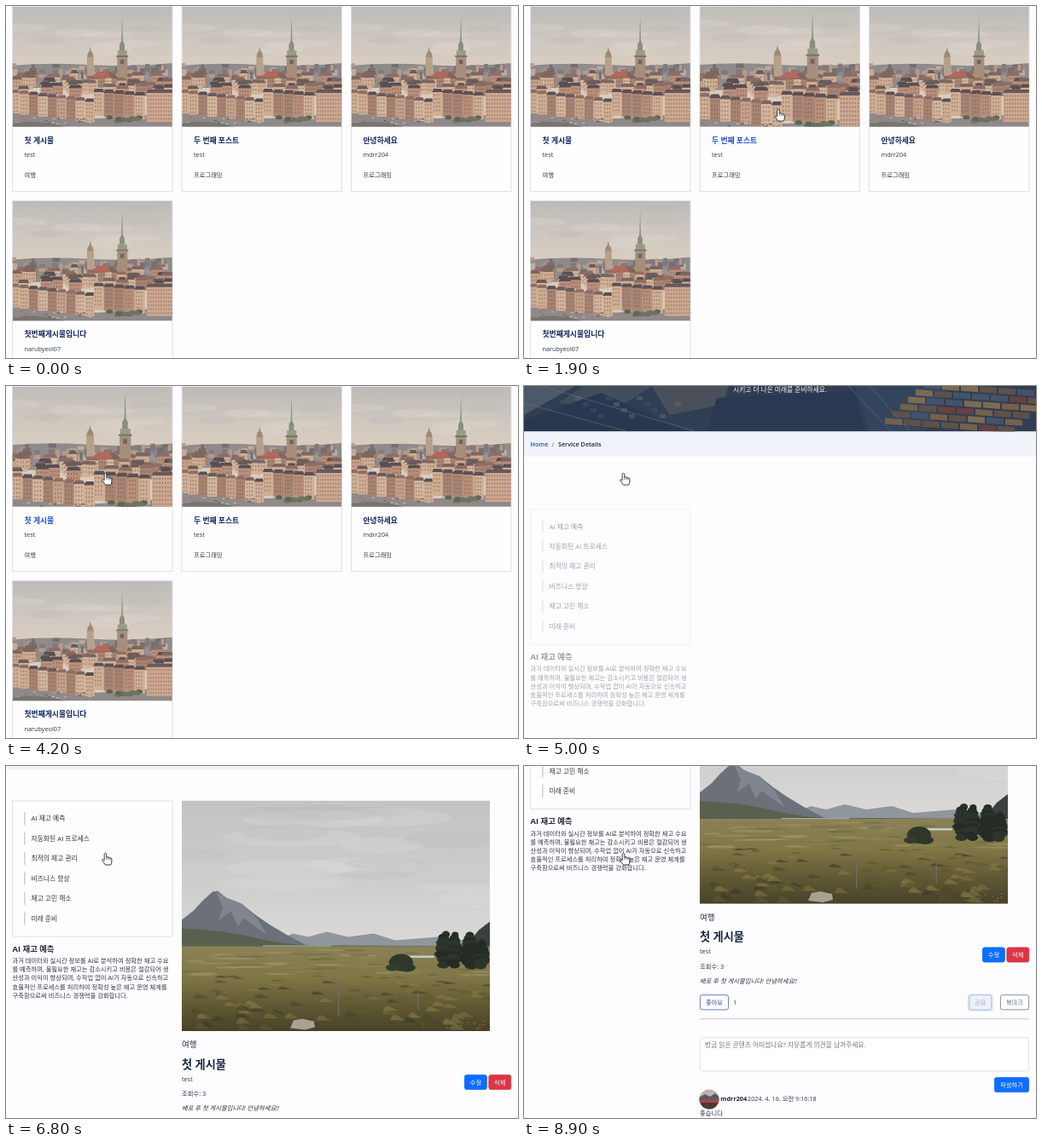
An HTML page that plays this animation: 600 px wide and 413 px high, repeating every 9000 ms.

```html
<!DOCTYPE html>
<html lang="ko">
<head>
<meta charset="utf-8">
<title>게시판</title>
<style>
  html, body { margin: 0; width: 100%; height: 100%; overflow: hidden; background: #fdfdff; }
  svg { display: block; width: 600px; height: 413px; }
  text { font-family: "Open Sans", "Noto Sans CJK KR", "Noto Sans CJK", sans-serif; white-space: pre; }
</style>
</head>
<body>
<svg id="stage" viewBox="0 0 600 413" xmlns="http://www.w3.org/2000/svg"></svg>
<script>
const LOOP = 9000, STEP = 100;
const INK = '#30343c', NAVY = '#14285f', BLUE = '#0d6efd', LINE = '#dfe0ea';

let seed = 11;
const rnd = (a = 0, b = 1) => {
  seed = (seed * 16807) % 2147483647;
  return a + (b - a) * seed / 2147483647;
};
const pick = list => list[Math.floor(rnd(0, list.length))];
const n = v => +v.toFixed(1);
const many = (count, fn) => Array.from({ length: count }, (_, i) => fn(i)).join('');

const rect = (x, y, w, h, fill, more = '') =>
  `<rect x="${n(x)}" y="${n(y)}" width="${n(w)}" height="${n(h)}" fill="${fill}" ${more}/>`;
const path = (d, fill, more = '') => `<path d="${d}" fill="${fill}" ${more}/>`;
const oval = (x, y, rx, ry, fill, more = '') =>
  `<ellipse cx="${n(x)}" cy="${n(y)}" rx="${n(rx)}" ry="${n(ry)}" fill="${fill}" ${more}/>`;
// y is the middle of the line
const text = (x, y, size, str, fill = INK, more = '') =>
  `<text x="${x}" y="${n(y + size * 0.36)}" font-size="${size}" fill="${fill}" ${more}>${str}</text>`;
const gradient = (id, ...stops) =>
  `<linearGradient id="${id}" x2="0" y2="1">${stops.map(([o, c]) => `<stop offset="${o}" stop-color="${c}"/>`).join('')}</linearGradient>`;
const button = (x, y, w, label, fill, stroke, color) =>
  rect(x + .4, y + .4, w - .8, 17.2, fill, `rx="2.5" stroke="${stroke}" stroke-width=".8"`) +
  text(x + w / 2, y + 9, 7.3, label, color, 'text-anchor="middle"');

function house(x, y, w, h, wall, roof) {
  let s = rect(x, y, w, h, wall) +
    path(`M${n(x - .5)} ${n(y)}l2 -4h${n(w - 3)}l2 4z`, roof);
  for (let r = y + 2.5; r < y + h - 3; r += 4.5)
    for (let c = x + 1.5; c < x + w - 1.5; c += 3) s += rect(c, r, 1.1, 2, '#6e5a55', 'opacity=".6"');
  return s;
}

function city() {
  const walls = ['#c6a088', '#b98f7a', '#cfae93', '#a98472', '#d2b59c'];
  const roofs = ['#6a5c5a', '#7d665f', '#584f52', '#8f6d62'];
  let s = rect(0, 0, 187, 141, 'url(#citySky)');
  s += many(9, () => oval(rnd(0, 187), rnd(8, 52), rnd(18, 40), rnd(3, 7), pick(['#e0d8cc', '#b9b5b2']), 'opacity=".3"'));
  s += path('M0 69Q40 65 90 68T187 66V95H0Z', '#8f8b8b');
  s += many(60, () => rect(rnd(-3, 184), rnd(66, 80), rnd(3, 9), rnd(4, 10), pick(['#a0938c', '#84797a', '#b49c8d', '#766f72', '#c0aa99'])));
  s += rect(87, 59, 8, 22, '#b7a08a') + path('M87 59l1.5-6h1l1.5-6 1.5 6h1l1.5 6z', '#9c8b78');
  s += many(48, i => house(rnd(-4, 180), 78 + i * .4, rnd(8, 16), rnd(10, 15), pick(walls), pick(roofs)));
  s += path('M127.4 40L128.3 11l.9 29 2 4v7h-6v-7z', '#87907f');
  s += rect(123, 51, 11, 7, '#9a9a86') + rect(121.5, 57, 14, 2, '#6f776c') + rect(122.5, 59, 12, 24, '#a58f7c');
  s += rect(126, 62, 4.5, 5, '#70675f') + path('M93 82l6-6h12l4 7z', '#b5675a');
  s += path('M0 123L100 131L187 125V141H0Z', '#8f8989');
  s += many(9, i => house(i * 11 - 3, 101 + i * 1.3, 11, 24, pick(walls), pick(roofs)));
  s += many(5, i => house(95 + i * 12, 100 + i, 12, 28, pick(walls), '#5b5054'));
  s += house(157, 101, 32, 34, '#cda78f', '#66595b');
  s += many(12, () => oval(rnd(112, 156), rnd(129, 134), 4, 2.5, pick(['#5c6654', '#6d7460'])));
  s += many(26, () => rect(rnd(2, 105), rnd(129, 138), 3, 1.2, pick(['#5f5d62', '#c5bdb6', '#a36f66'])));
  s += path('M0 137Q30 131 62 141H0Z', '#77756f');
  return s;
}

function pine(x, top, bottom, w) {
  return many(12, i => {
    const k = i / 11;
    return oval(x + rnd(-2, 2), top + (bottom - top) * k, 2 + w / 2 * Math.sin(.3 + k * 2.2), 4, pick(['#252b25', '#2d342b']));
  });
}

function valley() {
  let s = rect(0, 0, 361, 271, 'url(#valleySky)');
  s += many(16, () => oval(rnd(0, 361), rnd(10, 130), rnd(40, 90), rnd(4, 12), pick(['#dededd', '#b4b4b5']), 'opacity=".22"'));
  s += path('M110 165L130 156 148 160 170 154 195 160 225 156 250 164 300 160 361 168V182H100Z', '#90969c');
  s += path('M0 140L14 129 24 118 36 107 42 106 52 114 70 121 86 134 102 145 122 157 150 172H0Z', '#6b7079');
  s += path('M40 107L48 126 43 140 58 130 66 148 72 138 100 158 88 138 70 121 52 114Z', '#8b8f96', 'opacity=".7"');
  s += path('M0 150Q50 152 90 162T190 170L361 171V186H0Z', '#59604f');
  s += path('M336 167L348 152 361 142V190H330Z', '#3b423d');
  s += rect(0, 171, 361, 100, 'url(#grass)');
  s += many(60, () => oval(rnd(0, 361), rnd(174, 205), rnd(6, 26), rnd(.6, 1.6), pick(['#a39767', '#6a6a42', '#8c8555']), 'opacity=".6"'));
  s += rect(262, 182, 34, 2.4, '#c9cccb', 'rx="1"') + rect(95, 170, 80, 1.2, '#a4a79d');
  s += many(130, () => {
    const y = rnd(205, 270), h = (y - 190) / 12;
    return path(`M${n(rnd(0, 361))} ${n(y)}q3 ${n(-h * 1.6)} 8 ${n(-h)}t9 ${n(h)}z`, pick(['#4a482b', '#5f5831', '#867a47', '#3c3d27', '#78703f']), 'opacity=".65"');
  });
  s += oval(257, 190, 14, 10, '#2f372b') + oval(247, 196, 8, 4, '#363c2c') + oval(264, 196, 10, 5, '#2f372b');
  s += pine(308, 157, 193, 18) + pine(319, 158, 193, 14) + pine(338, 158, 194, 20) + pine(350, 166, 194, 16);
  s += rect(183, 211, 1.4, 42, '#75695a') + rect(276.5, 223, 1.4, 23, '#75695a') + rect(60, 228, 1, 18, '#655a49');
  s += path('M127 267l4-9 10-2 14 3 1 7-12 3z', '#aaa192');
  s += many(12, () => oval(rnd(310, 355), rnd(258, 268), 1.2, .8, '#a25a4c'));
  return s;
}

function hero() {
  let s = rect(0, 0, 600, 53.5, '#303d53');
  s += path('M0 0H60L0 34Z', '#4d5868') + path('M70 0H150L110 26 40 20Z', '#424d5c');
  s += path('M0 40L90 8 190 53H0Z', '#293750') + path('M150 0H240L232 22 170 34Z', '#56595d', 'opacity=".7"');
  s += many(15, i => rect(60 + i * 9, 12 + (i * 7) % 28, 7, 5, pick(['#59616b', '#6b6258', '#3d4c66']), 'opacity=".6"'));
  s += path('M226 14L388 6 398 53H214Z', '#2a3852') + path('M388 0H500L470 53H404Z', '#34445d');
  for (let r = 0; r < 6; r++)
    s += many(7, i => rect(468 + i * 22 - r * 9, r * 9 + 1, 20, 7, pick(['#74614c', '#5f5148', '#45526a', '#7d6b51', '#65413f']), 'transform="skewY(4) translate(0 -38)"'));
  s += path('M380 0L430 53M405 0L452 53M0 20L120 53M20 0L200 53', 'none', 'stroke="#687280" stroke-width="1" opacity=".6"');
  return s + text(300, 4, 7.75, '시키고 더 나은 미래를 준비하세요.', '#f4f6fa', 'text-anchor="middle"');
}

const cards = [
  [7.5, .5, '첫 게시물', 'test', '여행'],
  [206, .5, '두 번째 포스트', 'test', '프로그래밍'],
  [404.5, .5, '안녕하세요', 'mdrr204', '프로그래밍'],
  [7.5, 228.2, '첫번째게시물입니다', 'narubyeol07', '여행']
];
const card = ([x, y, title, user, topic]) => `<g transform="translate(${x} ${y})">` +
  rect(0, 0, 187.5, 217, '#fefeff', `stroke="${LINE}"`) +
  `<g clip-path="url(#cardClip)"><g class="zoom"><use href="#city" x=".3" y=".5"/></g></g>` +
  text(14, 157, 8.8, title, NAVY, 'class="title" font-weight="700"') +
  text(14, 174.3, 7.3, user) + text(14, 197.6, 7.3, topic) + '</g>';

const menu = ['AI 재고 예측', '자동화된 AI 프로세스', '최적의 재고 관리', '비즈니스 향상', '재고 고민 해소', '미래 준비'];
const about = [
  '과거 데이터와 실시간 정보를 AI로 분석하여 정확한 재고 수요',
  '를 예측하며, 불필요한 재고는 감소시키고 비용은 절감되어 생',
  '산성과 이익이 향상되며, 수작업 없이 AI가 자동으로 신속하고',
  '효율적인 프로세스를 처리하여 정확성 높은 재고 운영 체계를',
  '구축함으로써 비즈니스 경쟁력을 강화합니다.'
];
const sidebar = () => rect(7.5, 119.5, 187.5, 159, '#fefeff', `stroke="${LINE}"`) +
  menu.map((m, i) => rect(21.2, 132.5 + i * 23.45, 1.3, 15, '#c3c6ce') + text(29.5, 140 + i * 23.45, 7.8, m)).join('') +
  text(7.5, 293, 9.4, menu[0], '#232a3a', 'font-weight="700"') +
  about.map((l, i) => text(7.5, 307 + i * 10.15, 7.3, l)).join('');

const article = () => '<use href="#valley" x="206" y="119"/>' +
  text(206, 405.5, 9.5, '여행', '#232a3a', 'font-weight="500"') +
  text(206, 428.5, 13.2, '첫 게시물', '#1c2540', 'font-weight="700"') +
  text(206, 445.5, 7.3, 'test') + text(206, 463, 7.3, '조회수: 3') +
  text(206, 480.3, 7.3, '배포 후 첫 게시물입니다! 안녕하세요!!', INK, 'font-style="italic"') +
  button(537, 440.5, 26.8, '수정', BLUE, BLUE, '#fff') +
  button(565.4, 440.5, 26.8, '삭제', '#dc3545', '#dc3545', '#fff') +
  button(206, 496.3, 34, '좋아요', '#fefeff', '#3c5fb4', '#2c4c9c') + text(245, 505.3, 7.3, '1') +
  rect(519.8, 495.5, 30, 20.5, '#c9d5ee', 'rx="4" opacity=".6"') +
  button(521.5, 496.3, 26.5, '공유', '#edf1fa', '#a9b8d8', '#a3aec6') +
  button(558, 496.3, 34, '북마크', '#fefeff', '#6c757d', '#6c757d') +
  rect(206, 524.2, 386, 1, '#c6c7cc') +
  rect(206.4, 547, 385.2, 39, '#fff', 'rx="2.5" stroke="#d9dce3" stroke-width=".8"') +
  text(212, 555.3, 7.75, '방금 읽은 콘텐츠 어떠셨나요? 자유롭게 의견을 남겨주세요.', '#737880') +
  button(551, 593, 41, '작성하기', BLUE, BLUE, '#fff') +
  '<g clip-path="url(#face)">' + rect(205, 607, 24, 24, '#b9b3b1') +
  path('M205 617l7-4 6 3 6-4 6 5v5h-25z', '#595a5c') + rect(205, 619, 24, 5, '#a2474b') + rect(205, 623, 24, 8, '#4d3a35') + '</g>' +
  text(230.3, 618.4, 7.3, 'mdrr204', '#20242c', 'font-weight="700"') +
  text(262, 618.4, 7.3, '2024. 4. 16. 오전 9:16:18') + text(206, 635, 7.3, '좋습니다');

document.getElementById('stage').innerHTML = '<defs>' +
  gradient('citySky', [0, '#bdbab8'], [.3, '#cfc8bf'], [.5, '#d9cdbf']) +
  gradient('valleySky', [0, '#c3c3c3'], [.35, '#cdcdcc'], [.62, '#dad9d7']) +
  gradient('grass', [0, '#8a8257'], [.35, '#807747'], [.7, '#5f5833'], [1, '#45422a']) +
  '<clipPath id="cardClip"><rect x=".3" y=".5" width="187" height="140.5"/></clipPath>' +
  '<clipPath id="photoClip"><rect width="361" height="270.5"/></clipPath>' +
  '<clipPath id="heroClip"><rect width="600" height="53.5"/></clipPath>' +
  '<clipPath id="face"><circle cx="217" cy="619" r="11.5"/></clipPath>' +
  `<g id="city">${city()}</g><g id="valley" clip-path="url(#photoClip)">${valley()}</g></defs>` +
  `<g id="list">${cards.map(card).join('')}</g>` +
  `<g id="post"><g clip-path="url(#heroClip)">${hero()}</g>` + rect(0, 54, 600, 28.7, '#f1f3fb') +
  text(7.5, 68, 7.2, 'Home', '#2450a8', 'font-weight="600"') + text(32.7, 68, 7.2, '/', '#5c6373') +
  text(40, 68, 7.2, 'Service Details', '#1d2638', 'font-weight="600"') +
  `<g id="side">${sidebar()}</g><g id="main">${article()}</g></g>` +
  '<g id="hand">' + path('M-1.3 1.2Q0 -.7 1.3 1.2V5Q2.6 4.2 3.5 5.3Q4.8 4.7 5.5 6Q7.2 5.6 7.4 7.2V10Q7.2 12.6 6.2 14H0Q-2 11.5 -4 8.4Q-3.6 6.8 -1.3 8.6Z', '#fff', 'stroke="#22242a" stroke-width=".9" stroke-linejoin="round"') +
  path('M1.3 5v3M3.5 5.3v2.7M5.5 6v2.2', 'none', 'stroke="#22242a" stroke-width=".6"') + '</g>';

const get = id => document.getElementById(id);
const [list, post, side, main, hand] = ['list', 'post', 'side', 'main', 'hand'].map(get);
const zooms = document.querySelectorAll('.zoom'), titles = document.querySelectorAll('.title');

// rows of [time, value, ...]
const moves = [[1300, 322, 330], [1500, 308, 190], [1800, 298, 121], [1900, 298, 121], [2300, 295.5, 108],
  [3500, 295.5, 108], [3700, 215, 104], [3900, 130, 102], [4000, 116.5, 102]];
const scrolls = [[6100, 0], [6400, 35], [6800, 78.5], [7100, 135], [7500, 135], [7900, 182], [8700, 182], [8900, 228]];
const hovers = [
  [[3700, 0], [4000, 1]],
  [[1500, 0], [1800, 1], [3700, 1], [4000, 0]]
];

function at(rows, t, col = 1) {
  const i = rows.findIndex(r => r[0] > t);
  if (i === 0) return rows[0][col];
  if (i < 0) return rows[rows.length - 1][col];
  const a = rows[i - 1], b = rows[i];
  return a[col] + (b[col] - a[col]) * (t - a[0]) / (b[0] - a[0]);
}
const smooth = p => p * p * (3 - 2 * p);

function fadeUp(el, t, start) {
  const p = smooth(Math.min(1, Math.max(0, (t - start) / 600)));
  el.setAttribute('opacity', p);
  el.setAttribute('transform', `translate(0 ${45 * (1 - p)})`);
}

function draw(t) {
  const opened = t >= 4400;
  list.style.display = opened ? 'none' : '';
  post.style.display = opened ? '' : 'none';
  hand.style.display = t >= 1300 ? '' : 'none';
  hand.setAttribute('transform', `translate(${at(moves, t)} ${at(moves, t, 2)})`);
  hovers.forEach((rows, i) => {
    const h = smooth(at(rows, t)), k = 1 + .1 * h;
    zooms[i].setAttribute('transform', `translate(93.8 70.8) scale(${k}) translate(-93.8 -70.8)`);
    titles[i].setAttribute('fill', `rgb(${20 + 16 * h},${40 + 40 * h},${95 + 105 * h})`);
  });
  post.setAttribute('transform', `translate(0 ${-at(scrolls, t)})`);
  fadeUp(side, t, 4720);
  fadeUp(main, t, 5200);
}

const begin = performance.now();
function tick() {
  const t = (performance.now() - begin) % LOOP;
  draw(Math.floor(t / STEP) * STEP);
  requestAnimationFrame(tick);
}
tick();
</script>
</body>
</html>
```
